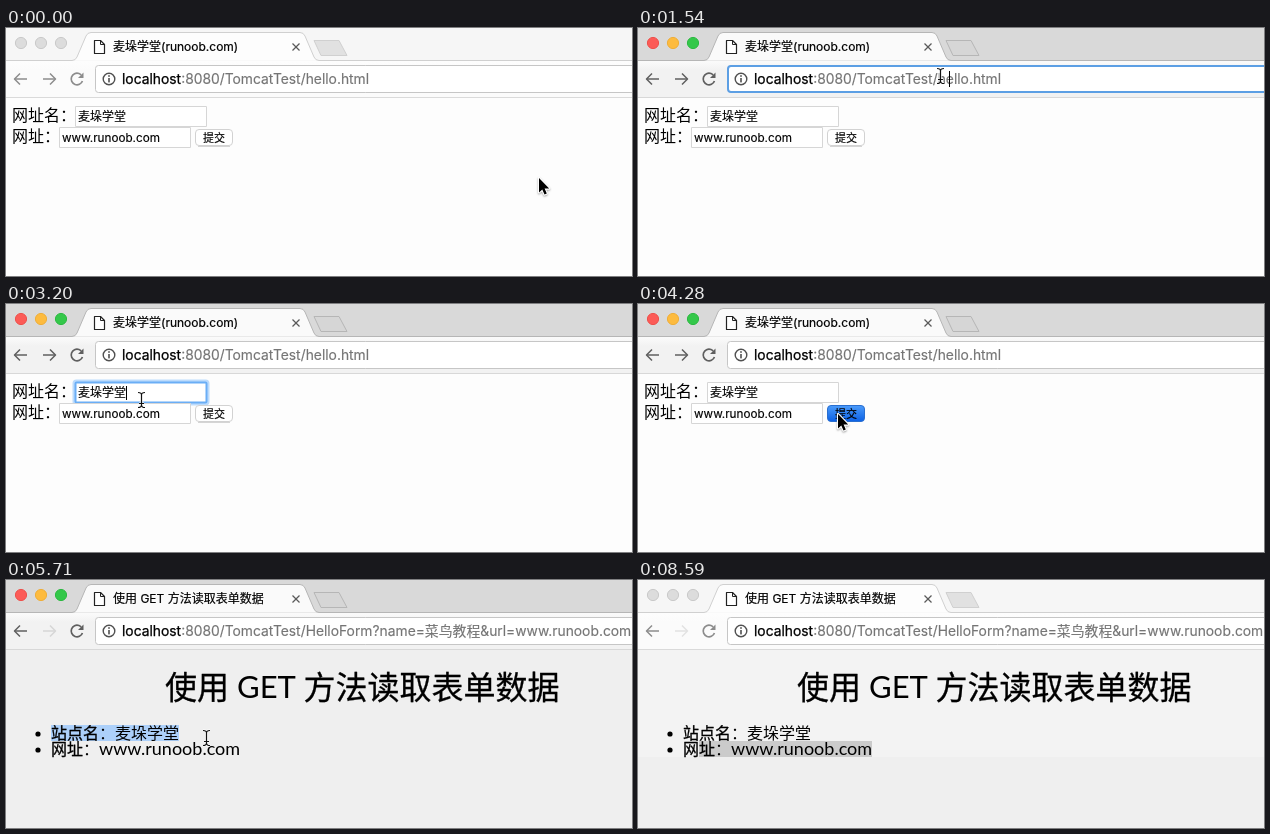
Recreate the animation shown at these times as an HTML page with a canvas. Size 626 px wide and 248 px high, loop 8.69 s.

```html
<!DOCTYPE html>
<html lang="zh-CN">
<head>
<meta charset="utf-8">
<title>GET form</title>
<style>
html, body { margin: 0; width: 100%; height: 100%; overflow: hidden; background: #fdfdfd; }
canvas { display: block; }
</style>
</head>
<body>
<canvas id="stage" width="626" height="248"></canvas>
<script>
const W = 626, H = 248, LOOP = 8690;
const ctx = document.getElementById('stage').getContext('2d');
const SANS = 'Inter, "Noto Sans CJK SC", "Noto Sans CJK", sans-serif';
const GEO = 'Lato, "Noto Sans CJK SC", "Noto Sans CJK", sans-serif';
const SITE = '麦垛学堂', HOST = 'www.runoob.com';
const HEADING = ['使用', 'GET', '方法读取表单数据'];

const ACTIVE = {
  strip: '#d9d9d9', tab: '#fafafa', bar: '#f2f2f2', line: '#b6b6b6', edge: '#d8d8d8',
  icon: '#5f5f5f', dim: '#d6d6d6', plus: '#d6d6d6',
  lights: ['#fc5b57', '#fdbb3f', '#34c84a'], rims: ['#ee504b', '#efae38', '#2cb941'],
  select: '#acd0fa', page: '#efefef'
};
const IDLE = {
  strip: '#f6f6f6', tab: '#fdfdfd', bar: '#fbfbfb', line: '#d0d0d0', edge: '#dadada',
  icon: '#8c8c8c', dim: '#e2e2e2', plus: '#e1e1e1',
  lights: Array(3).fill('#dcdcdc'), rims: Array(3).fill('#c9c9c9'),
  select: '#cbcbcb', page: '#f3f3f3'
};

// Pointer path: time, x, y
const PATH = [
  [0, 533, 150], [350, 533, 150], [1180, 302, 48], [1780, 302, 48],
  [2240, 462, 102], [2720, 213, 107], [3080, 135, 96], [3200, 135, 96],
  [3440, 126, 110], [3680, 150, 110], [4160, 200, 110], [4520, 200, 110],
  [5000, 49, 153], [5470, 200, 158], [5710, 200, 158], [5950, 242, 169],
  [6430, 56, 169], [6550, 60, 169], [7030, 369, 170], [7270, 600, 210],
  [7390, 616, 124], [7510, 618, 66], [7750, 618, 222], [7870, 640, 240]
];

const clamp = (v, a, b) => Math.min(b, Math.max(a, v));

function snap(t) {
  if (t < 110) return 0;
  const lag = t < 1420 ? 0 : t < 2720 ? 10 : t < 5470 ? 30 : 40;
  return 110 + Math.floor((t + lag - 110) / 120) * 120 - lag;
}

function pointer(t) {
  const i = PATH.findIndex(p => p[0] > t);
  if (i < 0) return { x: 700, y: 240 };
  const [t0, x0, y0] = PATH[i - 1], [t1, x1, y1] = PATH[i];
  const u = (t - t0) / (t1 - t0), e = u * 0.5 + u * u * (3 - 2 * u) * 0.5;
  return { x: x0 + (x1 - x0) * e, y: y0 + (y1 - y0) * e };
}

function rect(x, y, w, h, color) {
  ctx.fillStyle = color;
  ctx.fillRect(x, y, w, h);
}

function shade(y0, y1, from, to) {
  const g = ctx.createLinearGradient(0, y0, 0, y1);
  g.addColorStop(0, from);
  g.addColorStop(1, to);
  return g;
}

function round(x, y, w, h, r, fill, line, width = 1) {
  ctx.beginPath();
  ctx.roundRect(x, y, w, h, r);
  if (fill) { ctx.fillStyle = fill; ctx.fill(); }
  if (line) stroke(line, width);
}

function disc(x, y, r, fill, line, width = 1) {
  ctx.beginPath();
  ctx.arc(x, y, r, 0, 7);
  if (fill) { ctx.fillStyle = fill; ctx.fill(); }
  if (line) stroke(line, width);
}

function poly(points, closed) {
  ctx.beginPath();
  points.forEach(([x, y]) => ctx.lineTo(x, y));
  if (closed) ctx.closePath();
}

function stroke(color, width) {
  ctx.strokeStyle = color;
  ctx.lineWidth = width;
  ctx.stroke();
}

// Draws text and returns the x where it ends
function text(s, x, y, size, { color = '#000', family = SANS, weight = 400, heavy = 0 } = {}) {
  ctx.font = `${weight} ${size}px ${family}`;
  ctx.fillStyle = color;
  ctx.fillText(s, x, y);
  if (heavy) {
    ctx.strokeStyle = color;
    ctx.lineWidth = heavy;
    ctx.strokeText(s, x, y);
  }
  return x + ctx.measureText(s).width;
}

function tabStrip(skin, title) {
  rect(0, 0, W, 33, skin.strip);
  skin.lights.forEach((c, i) => disc(15 + 20 * i, 15, 5.6, c, skin.rims[i]));
  rect(0, 33, W, 36, shade(34, 42, skin.tab, skin.bar));
  rect(0, 69, W, 1, skin.edge);

  ctx.lineJoin = 'round';
  ctx.beginPath();
  ctx.moveTo(-1, 32.5);
  ctx.lineTo(66, 32.5);
  ctx.quadraticCurveTo(69.5, 32.5, 71, 29);
  ctx.lineTo(80, 8);
  ctx.quadraticCurveTo(81.5, 4.5, 85, 4.5);
  ctx.lineTo(294, 4.5);
  ctx.quadraticCurveTo(297.5, 4.5, 299, 8);
  ctx.lineTo(308, 29);
  ctx.quadraticCurveTo(309.5, 32.5, 313, 32.5);
  ctx.lineTo(W + 1, 32.5);
  ctx.fillStyle = skin.tab;
  ctx.fill();
  stroke(skin.line, 1);

  poly([[308, 12.5], [333, 12.5], [341, 27.5], [315, 27.5]], true);
  ctx.fillStyle = skin.plus;
  ctx.fill();
  stroke(skin.line, 1);

  poly([[88.5, 12.5], [94.5, 12.5], [98.5, 16.5], [98.5, 25.5], [88.5, 25.5]], true);
  ctx.fillStyle = '#fff';
  ctx.fill();
  stroke('#222', 1.2);
  poly([[94.5, 12.5], [94.5, 16.5], [98.5, 16.5]]);
  stroke('#222', 1);

  for (const d of [3.5, -3.5]) {
    poly([[290 - d, 15.5], [290 + d, 22.5]]);
    stroke('#5a5a5a', 1.3);
  }
  text(title, 107, 23, 12, { heavy: 0.2 });
}

function arrow(x, dir, color) {
  poly([[x - 6 * dir, 51], [x + 6 * dir, 51]]);
  stroke(color, 1.5);
  poly([[x + dir, 45.5], [x + 6.5 * dir, 51], [x + dir, 56.5]]);
  stroke(color, 1.5);
}

function toolbar(skin, s) {
  arrow(15, -1, skin.icon);
  arrow(43, 1, s.result ? skin.dim : skin.icon);
  ctx.beginPath();
  ctx.arc(71, 51, 5.8, 0.35, 5.5);
  stroke(skin.icon, 1.7);
  poly([[77.5, 44.5], [77.5, 50], [72, 50]], true);
  ctx.fillStyle = skin.icon;
  ctx.fill();

  const focus = s.focus === 'bar';
  round(focus ? 90 : 89.5, focus ? 38 : 37.5, W, focus ? 26 : 27, 3, '#fff',
    focus ? '#5c9fe4' : '#c6c6c6', focus ? 2 : 1);
  disc(103, 51, 5.8, null, '#505050', 1.4);
  rect(102.2, 50, 1.6, 4.4, '#505050');
  rect(102.2, 47.2, 1.6, 1.6, '#505050');

  if (s.barSelected) rect(116, 42, 251, 18, '#b3d6fd');
  const x = text('localhost', 116, 56, 13.85, { heavy: 0.25 });
  const query = s.result ? 'HelloForm?name=菜鸟教程&url=' + HOST : 'hello.html';
  text(':8080/TomcatTest/' + query, x, 56, 13.85, { color: '#757575', heavy: 0.15 });
}

function field(x, y, value, focused) {
  if (focused) {
    round(x - 0.5, y - 0.5, 133, 22, 2, null, 'rgba(110,178,250,.45)', 4);
    round(x + 0.5, y + 0.5, 131, 20, 1, '#fff', '#6aaef6', 2);
  } else {
    round(x + 0.5, y + 0.5, 131, 20, 0, '#fff', '#d6d6d6');
  }
  text(value, x + 3, y + 15, value === HOST ? 11.7 : 12, { heavy: 0.15 });
}

function formPage(s) {
  rect(0, 70, W, H - 70, '#fdfdfd');
  text('网址名：', 6, 93, 16);
  text('网址：', 6, 114, 16);
  field(69, 78, SITE, s.focus === 'name');
  field(53, 99, HOST, s.focus === 'url');

  const fill = s.pressed ? shade(101, 118, '#4d9dfb', '#0a5fe4') : '#fff';
  round(189.5, 101.5, 37, 16, 3.5, fill, s.pressed ? '#2a6fd0' : '#d2d2d2');
  if (!s.pressed) rect(192, 118, 32, 0.6, '#bbb');
  text('提交', 197, 114, 11, { heavy: 0.15 });
}

function resultPage(skin, s) {
  rect(0, 70, W, H - 70, ACTIVE.page);
  rect(0, 70, W, 107, skin.page);
  text(HEADING[0], 159, 118.5, 32, { family: GEO, heavy: 0.3 });
  text(HEADING[1], 231, 118, 31, { family: GEO });
  text(HEADING[2], 297.5, 118.5, 32, { family: GEO, heavy: 0.3 });

  if (s.range) {
    const [row, from, to] = s.range;
    rect(from, 145 + 16 * row, to - from, 16, skin.select);
  }
  disc(32, 154, 2.6, '#000');
  disc(32, 170, 2.6, '#000');
  text('：', text('站点名', 45, 159, 16, { heavy: 0.3 }), 159, 16);
  text(SITE, 109, 159, 16);
  text('：', text('网址', 45, 175, 16, { heavy: 0.3 }), 175, 16);
  text(HOST, 93, 174.5, 18, { family: GEO });
}

function isText(x, y, result) {
  const inside = (a, b, c, d) => x >= a && x < c && y >= b && y < d;
  if (inside(112, 38, W, 65)) return true;
  return result ? inside(40, 145, 260, 179)
    : inside(69, 78, 201, 99) || inside(53, 99, 185, 120);
}

function drawPointer({ x, y }, beam) {
  ctx.save();
  ctx.translate(Math.round(x), Math.round(y));
  if (beam) {
    for (const [color, width] of [['rgba(255,255,255,.8)', 2.6], ['#111', 1.2]]) {
      ctx.beginPath();
      ctx.moveTo(-3, -7.5);
      ctx.quadraticCurveTo(0.5, -7.5, 0.5, -5);
      ctx.lineTo(0.5, 5);
      ctx.quadraticCurveTo(0.5, 7.5, -3, 7.5);
      ctx.moveTo(4, -7.5);
      ctx.quadraticCurveTo(0.5, -7.5, 0.5, -5);
      ctx.moveTo(4, 7.5);
      ctx.quadraticCurveTo(0.5, 7.5, 0.5, 5);
      ctx.moveTo(-2, 3.5);
      ctx.lineTo(3, 3.5);
      stroke(color, width);
    }
  } else {
    poly([[0, 0], [0, 14.5], [3.3, 11.4], [5.5, 16.6], [7.8, 15.6], [5.6, 10.6], [10.2, 10.6]], true);
    ctx.shadowColor = 'rgba(0,0,0,.35)';
    ctx.shadowBlur = 2;
    ctx.shadowOffsetY = 1;
    stroke('#fff', 2.2);
    ctx.shadowColor = 'transparent';
    ctx.fillStyle = '#000';
    ctx.fill();
  }
  ctx.restore();
}

function stateAt(t, x) {
  let focus = '', range = null;
  if (t >= 1310 && t < 3080) focus = 'bar';
  else if (t >= 3080 && t < 3440) focus = 'name';
  else if (t >= 3440 && t < 4160) focus = 'url';

  if (t >= 5000 && t < 5830) range = [0, 45, clamp(x, 45, 173)];
  else if (t >= 5950) range = [1, t < 6500 ? clamp(x, 61, 234) : 61, 234];

  return {
    focus, range,
    barSelected: t >= 1310 && t < 1540,
    pressed: t >= 4160 && t < 4400,
    result: t >= 4400,
    idle: t < 110 || t >= 8590
  };
}

function drawCaret(t, focus) {
  const spots = { bar: [1540, 311, 43, 16], name: [3080, 120, 82, 14], url: [3440, 154, 103, 14] };
  if (!spots[focus]) return;
  const [start, x, y, h] = spots[focus];
  if (t >= start && (t - start) % 1060 < 530) rect(x, y, 1, h, '#000');
}

function draw(t) {
  const p = pointer(t), s = stateAt(t, p.x), skin = s.idle ? IDLE : ACTIVE;
  if (s.result) resultPage(skin, s);
  else formPage(s);
  tabStrip(skin, t >= 4640 ? HEADING.join(' ') : SITE + '(runoob.com)');
  toolbar(skin, s);
  drawCaret(t, s.focus);
  drawPointer(p, isText(p.x, p.y, s.result));
}

const begin = performance.now();
function tick() {
  draw(snap((performance.now() - begin) % LOOP));
  requestAnimationFrame(tick);
}
tick();
</script>
</body>
</html>
```
